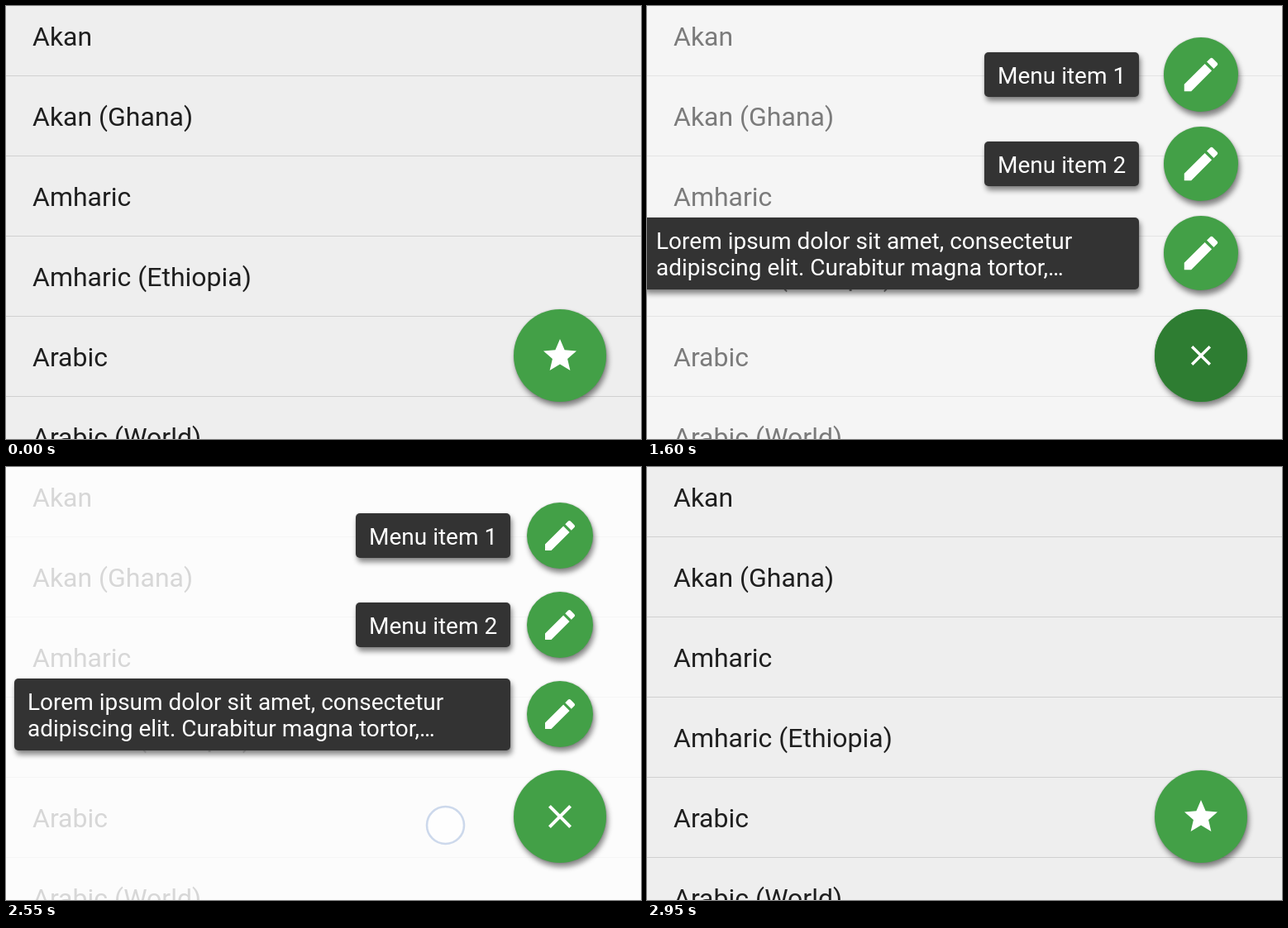
Recreate the animation shown at these times as an HTML page. Size 768 px wide and 524 px high, loop 3000 ms.

```html
<!DOCTYPE html>
<html lang="en">
<head>
<meta charset="utf-8">
<title>Speed dial menu</title>
<style>
  html, body { margin: 0; width: 100%; height: 100%; overflow: hidden; background: #eee; }
  svg { display: block; width: 100vw; height: 100vh; }
  text { font-family: Roboto, sans-serif; }
  .row text { font-size: 32px; fill: #1f1f1f; }
  .row rect { fill: #d0d0d0; }
  .label text { font-size: 28px; fill: #fff; }
  .label rect { fill: #333; }
  .raised { filter: drop-shadow(0 0 1px rgba(0, 0, 0, .18)) drop-shadow(2px 5px 3px rgba(0, 0, 0, .46)); }
  .green { fill: #43a047; }
  .icon { fill: #fff; }
</style>
</head>
<body>
<svg viewBox="0 0 768 524">
  <defs>
    <clipPath id="fabClip"><circle cx="670" cy="423" r="56"/></clipPath>
    <path id="pencil" d="M3 17.25V21h3.75L17.81 9.94l-3.75-3.75zM20.71 7.04c.39-.39.39-1.02 0-1.41l-2.34-2.34c-.39-.39-1.02-.39-1.41 0l-1.83 1.83 3.75 3.75z"/>
  </defs>
  <rect width="768" height="524" fill="#eee"/>
  <g id="list"></g>
  <rect id="overlay" width="768" height="524" fill="#fff"/>
  <g id="menu"></g>
  <circle class="green raised" cx="670" cy="423" r="56"/>
  <circle id="ripple" cx="650" cy="423" fill="#2e7d32" clip-path="url(#fabClip)"/>
  <path id="star" class="icon" d="M12 17.27L18.18 21l-1.64-7.03L22 9.24l-7.19-.61L12 2 9.19 8.63 2 9.24l5.46 4.73L5.82 21z"/>
  <path id="cross" class="icon" d="M19 6.41L17.59 5 12 10.59 6.41 5 5 6.41 10.59 12 5 17.59 6.41 19 12 13.41 17.59 19 19 17.59 13.41 12z"/>
  <g id="touch">
    <circle r="22" fill="#fff" fill-opacity=".66"/>
    <circle r="22.5" fill="none" stroke="#9db6dc" stroke-opacity=".5" stroke-width="2.6"/>
  </g>
</svg>
<script>
const LOOP = 3000, STEP = 50, DURATION = 200;
const TAP_OPEN = 1350, OPEN = 1500, TAP_CLOSE = 2550, CLOSE = 2600;
const $ = id => document.getElementById(id);
const clamp = v => Math.min(1, Math.max(0, v));
const set = (el, attrs) => { for (const k in attrs) el.setAttribute(k, attrs[k]); };

const languages = ["Akan", "Akan (Ghana)", "Amharic", "Amharic (Ethiopia)", "Arabic", "Arabic (World)"];
$("list").innerHTML = languages.map((name, i) => `<g class="row" transform="translate(0 ${97 * i})">
  <text x="32" y="48">${name}</text><rect y="84" width="768" height="1"/></g>`).join("");

const items = [
  { y: 83, x: 423, top: 56, height: 54, lines: ["Menu item 1"] },
  { y: 191, x: 423, top: 164, height: 54, lines: ["Menu item 2"] },
  { y: 299, x: 10, top: 256, height: 87,
    lines: ["Lorem ipsum dolor sit amet, consectetur", "adipiscing elit. Curabitur magna tortor,…"] }
];
$("menu").innerHTML = items.map(({ y, x, top, height, lines }) => `
  <g transform="translate(670 ${y})"><g class="mini raised"><circle class="green" r="40"/>
    <use href="#pencil" class="icon" transform="translate(-24 -24) scale(2)"/></g></g>
  <g class="label"><rect class="raised" x="${x}" y="${top}" width="${610 - x}" height="${height}" rx="5"/>
    ${lines.map((s, i) => `<text x="${x + 16}" y="${top + 38 + 32 * i}">${s}</text>`).join("")}</g>`).join("");
const minis = document.querySelectorAll(".mini"), labels = document.querySelectorAll(".label");

const overshoot = p => 1 + (p - 1) ** 2 * (3 * (p - 1) + 2);
const iconAt = scale => `translate(670 423) scale(${2 * scale}) translate(-12 -12)`;
const show = (el, visible) => set(el, { visibility: visible ? "visible" : "hidden" });

function draw(t) {
  const opened = clamp((t - OPEN) / DURATION), closed = clamp((t - CLOSE) / DURATION);
  const entry = overshoot(opened);
  const scale = closed ? 1 - closed ** 3 : entry;
  const shift = closed ? 124 * closed ** 2 : 120 * (1 - entry);
  const alpha = closed ? (1 - closed) ** 1.2 : clamp(entry);

  set($("overlay"), { opacity: .82 * opened * (1 - closed) });
  show($("menu"), opened > 0 && closed < 1);
  minis.forEach(el => set(el, { transform: `scale(${scale})` }));
  labels.forEach(el => set(el, { transform: `translate(${shift} 0)`, opacity: alpha }));

  const crossed = opened > 0 && closed === 0;
  show($("cross"), crossed);
  show($("star"), !crossed);
  set($("cross"), { transform: iconAt(.72 + .28 * opened) });
  set($("star"), { transform: iconAt(closed ? 1.22 - .22 * closed : 1) });
  set($("ripple"), { r: 80 * clamp((t - TAP_OPEN) / 200), opacity: clamp((1950 - t) / 300) });

  const closing = t >= TAP_CLOSE, age = t - (closing ? TAP_CLOSE : TAP_OPEN);
  set($("touch"), {
    transform: closing ? "translate(531.5 433.5)" : "translate(650 423)",
    opacity: age < 0 ? 0 : clamp(1 - (age - 50) / 130)
  });
}

const start = performance.now();
function tick() {
  const t = (performance.now() - start) % LOOP;
  draw(Math.floor(t / STEP) * STEP);
  requestAnimationFrame(tick);
}
tick();
</script>
</body>
</html>
```
